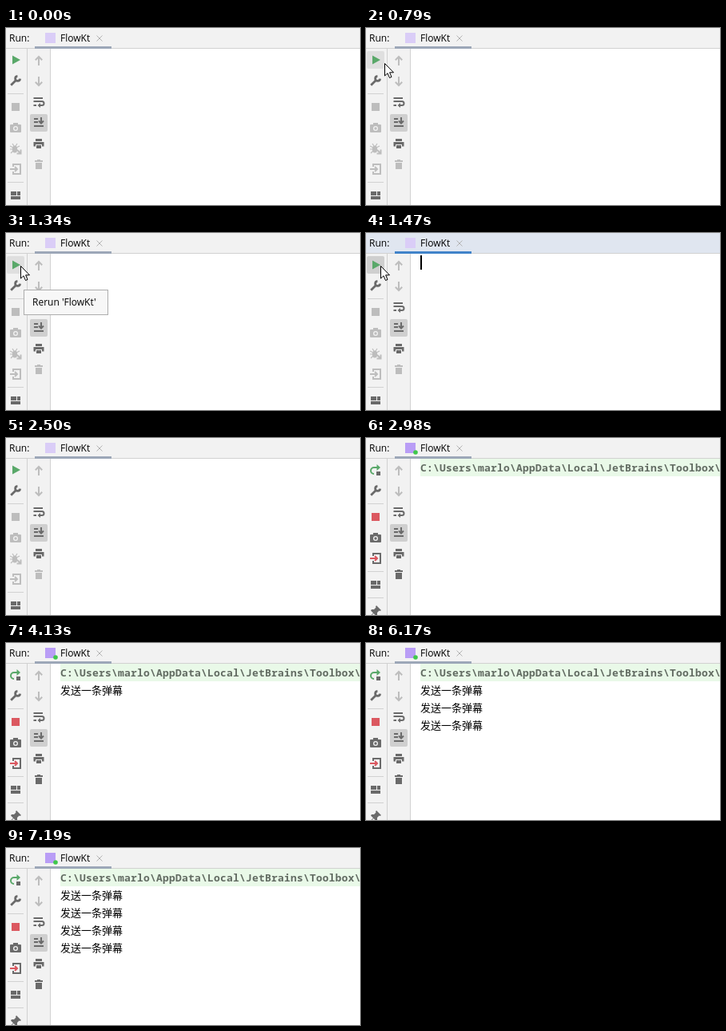
An HTML page that plays this animation: 443 by 222 pixels, repeating every 8 s.

```html
<!DOCTYPE html>
<html lang="zh">
<head>
<meta charset="utf-8">
<title>Run console</title>
<style>
html, body { margin: 0; width: 100%; height: 100%; overflow: hidden; background: #fff; }
svg { display: block; width: 443px; height: 222px; }
text { font: 12px "Open Sans", "Noto Sans", sans-serif; white-space: pre; }
.cmd { font: bold 13px "Noto Sans Mono", "DejaVu Sans Mono", monospace; letter-spacing: .2px; fill: #626b62; }
.out { font: 13px "Noto Sans CJK SC", "Noto Sans CJK", sans-serif; }
.line { fill: none; stroke: currentColor; stroke-width: 2; }
</style>
</head>
<body>
<svg id="stage" viewBox="0 0 443 222"></svg>
<script>
const LOOP = 8000;
const DARK = '#6a6a6a', DIM = '#bdbdbd', GREEN = '#59a869', RED = '#db5860', RULE = '#d1d1d1';
const stage = document.getElementById('stage');

const rect = (x, y, w, h, fill = 'currentColor', more = '') =>
  `<rect x="${x}" y="${y}" width="${w}" height="${h}" style="fill:${fill}" ${more}/>`;
const solid = d => `<path d="${d}" fill="currentColor"/>`;
const line = (d, style = '') => `<path class="line" style="${style}" d="${d}"/>`;
const text = (x, y, s, cls = '') => `<text x="${x}" y="${y}" class="${cls}">${s}</text>`;

// Icons are drawn around their centre; --side colours the second part of two-tone ones.
const icons = {
  play: solid('M-4-5.5L6 0L-4 5.5Z'),
  rerun: line('M-2 5A4 4 0 0 1-2-3H2') + solid('M1.5-7L6-3L1.5 1Z') + rect(1, 2, 5, 5, 'var(--side)'),
  wrench: line('M-5.8 5.8L1-1M2.4-5.6A3 3 0 1 0 5.6-2.4', 'stroke-width:2.8'),
  stop: rect(-5, -5, 10, 10),
  camera: rect(-7, -4, 14, 10, 'currentColor', 'rx="1"') + rect(-3, -6, 6, 3) +
    '<circle cy="1" r="3" fill="#f2f2f2"/><circle cy="1" r="1.7" fill="currentColor"/>',
  bug: '<ellipse cx="-1" cy="1" rx="3.2" ry="4.6" fill="currentColor"/>' +
    line('M-7-3L-3-1M-7 1H-3M-6 6L-3 3M-4-6L-2-3M2-6L0-3M5-3L1-1', 'stroke-width:1.2') +
    line('M2 2L6 6M6.5 1.5V6.5H1.5'),
  exit: line('M-3-3V-6H6V6H-3V3', 'stroke:var(--side)') + line('M-7 0H2M-1-3L2 0L-1 3'),
  layout: rect(-6, -5, 7, 5) + rect(2, -5, 4, 5) + rect(-6, 1, 12, 4),
  pin: solid('M1-7L7-1L5.5 0L4.5-.5L2 2L2 5L.5 6L-2.5 3L-6.5 7L-7 6.5L-3 2.5L-6-.5L-5-2L-2-2L.5-4.5L0-5.5Z'),
  up: line('M0 6V-5M-4.2-.8L0-5L4.2-.8'),
  down: line('M0-6V5M-4.2.8L0 5L4.2.8'),
  wrap: line('M-6.5-5H5M-6.5-1H4A2.5 2.5 0 0 1 4 4H1M-6.5 4H-3') + solid('M2 1V7L-1.5 4Z'),
  end: line('M-6-4H-1M-6 0H-1M-6 5H6M3-6V1M0-1.5L3 1.5L6-1.5'),
  print: rect(-4, -6, 8, 3) + rect(-6.5, -2, 13, 5.5) + rect(-4, 1, 8, 5, '#f2f2f2') + rect(-3, 2, 6, 4),
  trash: rect(-2, -6, 4, 2) + rect(-5, -5, 10, 2) + rect(-4, -2, 8, 8),
};
const icon = (name, x, y, color, side = color) =>
  `<g transform="translate(${x} ${y})" style="color:${color};--side:${side}">${icons[name]}</g>`;

// Left column: rows 26px apart, a '-' draws a divider.
function column(items) {
  let y = 40;
  return items.map(([name, ...colors]) => {
    if (name === '-') {
      y += 7;
      return rect(2, y - 17, 20, 1, RULE);
    }
    const s = icon(name, 12, y, ...colors);
    y += 26;
    return s;
  }).join('');
}

const idle = [['play', GREEN], ['wrench', DARK], ['-'], ['stop', DIM], ['camera', DIM],
  ['bug', DIM], ['exit', DIM], ['-'], ['layout', DARK]];
const starting = [['rerun', DIM], ['wrench', DARK], ['-'], ['stop', RED], ['-'],
  ['layout', DARK], ['-'], ['pin', DARK]];
const running = [['rerun', GREEN, DARK], ['wrench', DARK], ['-'], ['stop', RED], ['camera', DARK],
  ['exit', RED, DARK], ['-'], ['layout', DARK], ['-'], ['pin', DARK]];

// [time, x, y]; a step without a place hides the pointer.
const pointer = [[0], [400, 84, 157], [520, 47, 122], [670, 30, 72], [790, 23, 44], [940, 20, 42],
  [1060, 18, 41], [2140, 40, 58], [2260, 105, 92], [2380, 210, 140], [2500]];
const outputs = [4130, 5140, 6170, 7190];

function draw(t) {
  const within = (a, b) => t >= a && t < b;
  const focus = within(1470, 2500), run = t >= 2620, live = t >= 2980;
  let s = rect(0, 0, 443, 222, '#fff') +
    rect(0, 0, 443, 25, focus ? '#e0e6f0' : '#f2f2f2') + rect(0, 25, 443, 1, RULE) +
    rect(0, 26, 55, 196, '#f2f2f2') + rect(26, 26, 1, 196, RULE) + rect(55, 26, 1, 196, RULE) +
    rect(36, 23, 96, 3, focus ? '#4083c9' : '#9ca7b8') +
    text(4, 17, 'Run:') + text(68, 17, 'FlowKt') +
    rect(49, 6, 13, 13, run ? '#b99df6' : '#dacdf7') +
    '<path d="M113.5 9.5L120.5 16.5M120.5 9.5L113.5 16.5" stroke="#b3b3b3"/>';
  if (run) s += '<circle cx="62" cy="18" r="2.8" fill="#3fc84b"/>';

  if (within(670, 2140)) {
    const pressed = within(1470, 1610) || t >= 1890;
    s += rect(1, 29, 22, 22, pressed ? '#cfcfcf' : '#dfdfdf', 'rx="2"');
  }
  s += column(live ? running : run ? starting : idle);
  s += rect(30, 108, 22, 22, '#cfcfcf', 'rx="2"') +
    icon('up', 41, 41, DIM) + icon('down', 41, 67, DIM) + icon('wrap', 41, 93, DARK) +
    icon('end', 41, 118, DARK) + icon('print', 41, 145, DARK) +
    icon('trash', 41, 171, live ? DARK : DIM);

  if (focus) s += rect(68, 28, 2, 18, '#000');
  if (t >= 2860) {
    s += rect(68, 26, 375, 22, '#e9f9e8') +
      text(68, 42, 'C:\\Users\\marlo\\AppData\\Local\\JetBrains\\Toolbox\\', 'cmd');
  }
  outputs.forEach((at, i) => {
    if (t >= at) s += text(68, 64 + 22 * i, '发送一条弹幕', 'out');
  });

  if (within(1340, 1470)) {
    s += rect(22.5, 71.5, 105, 31, '#f7f7f7', 'stroke="#adadad"') + text(33, 91, "Rerun 'FlowKt'");
  }
  const [, x, y] = pointer.filter(p => p[0] <= t).pop();
  if (x) {
    s += `<path transform="translate(${x} ${y})" fill="#fff" stroke="#000"
      d="M.5.5V16L4 12.7L6.5 18.5L9 17.4L6.6 11.8H11.5Z"/>`;
  }
  return s;
}

let shown = '';
function tick() {
  const s = draw(performance.now() % LOOP);
  if (s !== shown) stage.innerHTML = shown = s;
  requestAnimationFrame(tick);
}
tick();
</script>
</body>
</html>
```
